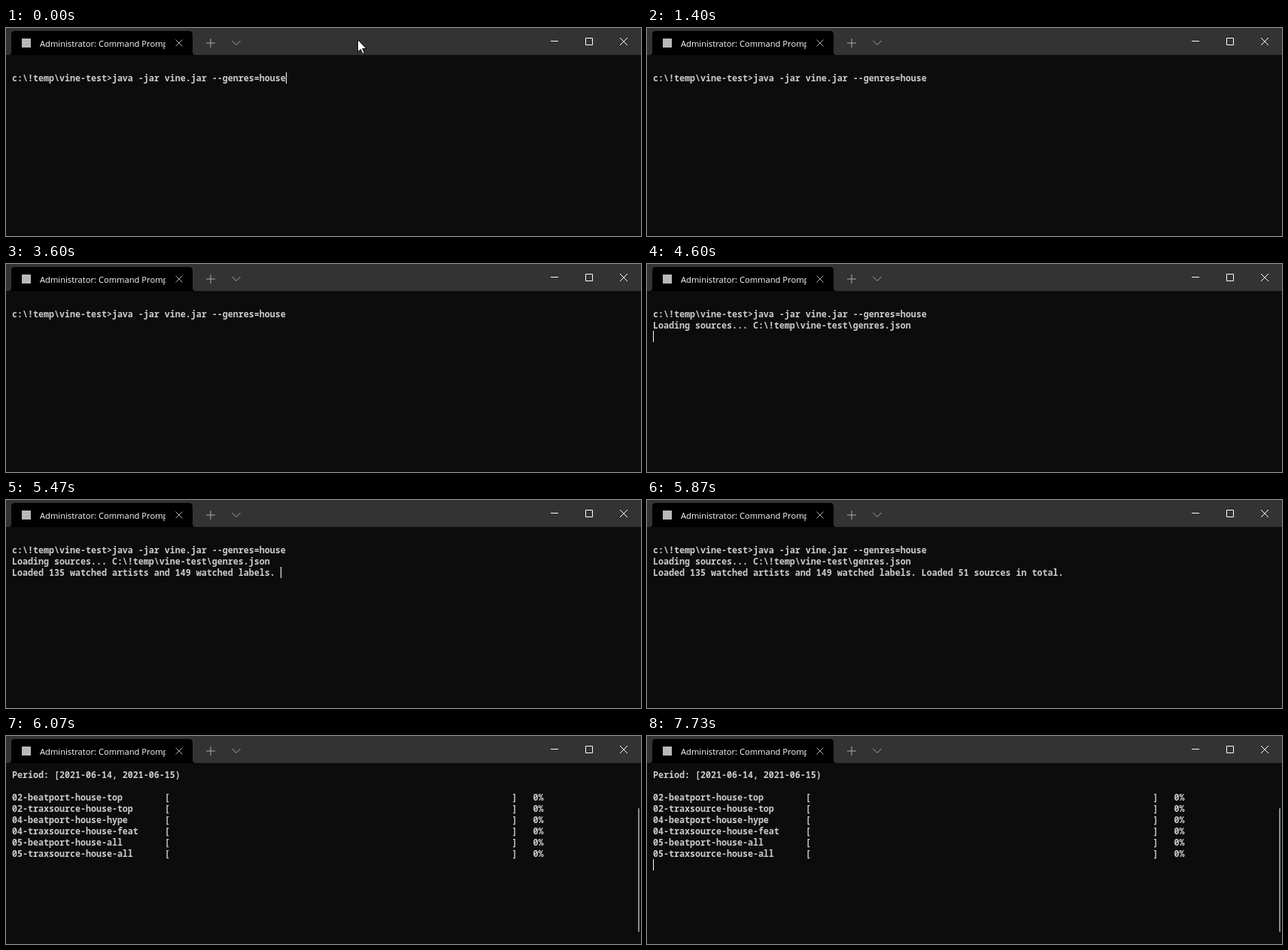
Recreate the animation shown at these times as an HTML page. Size 844 by 277 pixels, loop 8000 ms.

```html
<!DOCTYPE html>
<html lang="en">
<head>
<meta charset="utf-8">
<title>Terminal</title>
<style>
  html, body { margin: 0; width: 100%; height: 100%; overflow: hidden; background: #0c0c0c; }
  svg { position: absolute; left: 0; top: 0; }
  .title { font: 500 11.2px "Open Sans", "Noto Sans", sans-serif; fill: #fff; }
  #screen {
    position: absolute; left: 8px; top: 44px; margin: 0; color: #ccc;
    font: 600 11.667px/15px "Noto Sans Mono", monospace;
  }
  #caret { position: absolute; width: 1px; height: 15px; background: #fff; }
  #scrollbar { position: absolute; left: 840px; top: 96px; width: 2px; height: 165px; border-radius: 1px; background: #8a8a8a; }
</style>
</head>
<body>
<svg width="844" height="277" fill="none">
  <clipPath id="titleClip"><path d="M45 4H212V36H45Z"/></clipPath>
  <path fill="#333" d="M0 0H844V36H0Z"/>
  <path fill="#000" d="M3 36Q7 36 7 32V9Q7 4 12 4H243Q248 4 248 9V32Q248 36 252 36Z"/>
  <path fill="#b8b8b8" d="M21 14H33V26H21Z"/>
  <text class="title" x="45" y="25" clip-path="url(#titleClip)">Administrator: Command Prompt</text>
  <path stroke="#aaa" d="M225.5 15.5L234.5 24.5M234.5 15.5L225.5 24.5M266 20H278M272 14V26M300.5 17L306 22.5L311.5 17"/>
  <path stroke="#fff" d="M724 17.5H734M770.5 13.5H779.5V22.5H770.5ZM816 13L826 23M826 13L816 23"/>
  <path id="pointer" fill="#fff" stroke="#000" d="M467.5 15.5V32L471.3 28.4L474 34.5L476.5 33.4L473.8 27.5H479Z"/>
</svg>
<pre id="screen"></pre>
<div id="caret"></div>
<div id="scrollbar"></div>
<script>
const LOOP = 8000;
const $ = id => document.getElementById(id);

const command = "\nc:\\!temp\\vine-test>java -jar vine.jar --genres=house";
const loading = command + "\nLoading sources... ";
const sources = loading + "C:\\!temp\\vine-test\\genres.json\n";
const loaded = sources + "Loaded 135 watched artists and 149 watched labels. ";
const total = loaded + "Loaded 51 sources in total.\n";
const playlists = ["02-beatport-house-top", "02-traxsource-house-top", "04-beatport-house-hype",
  "04-traxsource-house-feat", "05-beatport-house-all", "05-traxsource-house-all"];
const progress = "Period: [2021-06-14, 2021-06-15)\n\n" +
  playlists.map(name => name.padEnd(29) + "[" + " ".repeat(65) + "]   0%\n").join("");

// Screen text and the times at which the caret toggles, starting visible or hidden
const scenes = [
  { start: 0, text: command, caret: true, blinks: [530] },
  { start: 800, text: command + "\n", caret: true, blinks: [1400, 2000, 2530, 3070, 3600] },
  { start: 4200, text: loading, caret: true, blinks: [] },
  { start: 4600, text: sources, caret: true, blinks: [4800, 5330] },
  { start: 5470, text: loaded, caret: true, blinks: [] },
  { start: 5530, text: total, caret: true, blinks: [5870] },
  { start: 6000, text: "", caret: false, blinks: [] },
  { start: 6070, text: progress, caret: false, blinks: [6470, 7000, 7530, 7670, 7730] },
];

const show = (id, visible) => { $(id).style.visibility = visible ? "visible" : "hidden"; };
let current;

function draw(now) {
  const t = now % LOOP;
  const scene = scenes.findLast(s => s.start <= t);
  if (scene !== current) {
    current = scene;
    const lines = scene.text.split("\n");
    $("screen").textContent = scene.text;
    $("caret").style.left = 8 + 7 * lines.at(-1).length + "px";
    $("caret").style.top = 44 + 15 * (lines.length - 1) + "px";
  }
  const toggles = scene.blinks.filter(time => time <= t).length;
  show("caret", scene.caret === (toggles % 2 === 0));
  show("pointer", t < 800);
  show("scrollbar", t >= 6000);
  requestAnimationFrame(draw);
}
draw(performance.now());
</script>
</body>
</html>
```
